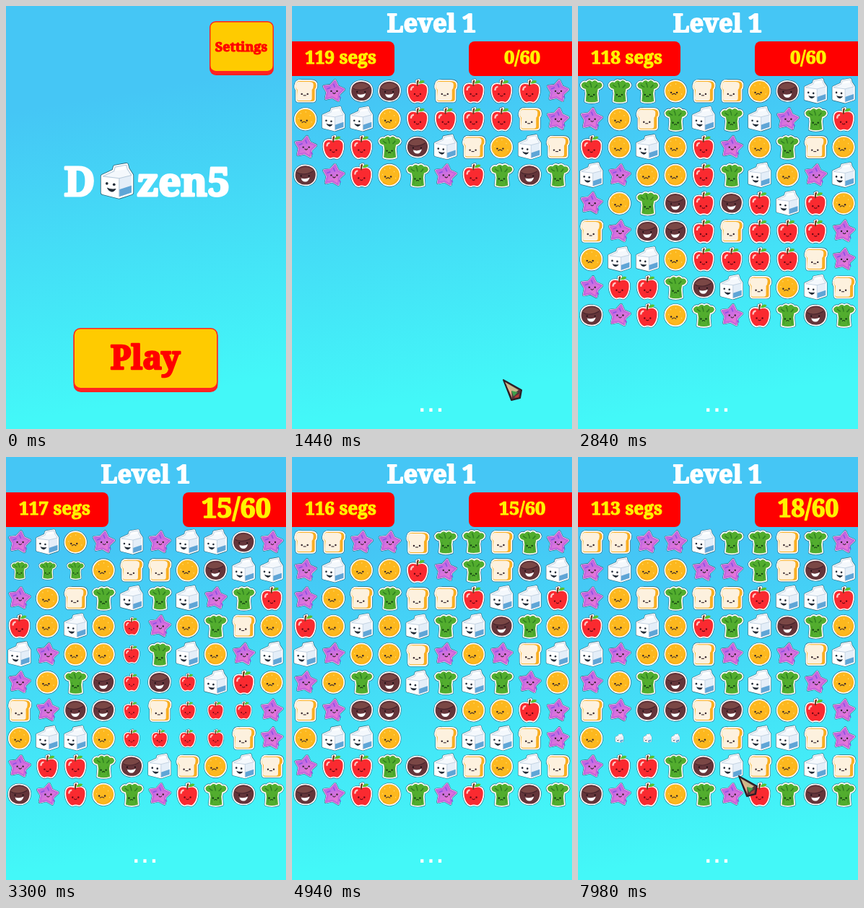
An HTML page for the animation above (8 s loop, 388 by 586 pixels).

```html
<!DOCTYPE html>
<html lang="en">
<head>
<meta charset="utf-8">
<title>Dozen5</title>
<style>
  html, body { margin: 0; width: 100%; height: 100%; overflow: hidden; background: #45c6f5; }
  svg { display: block; width: 388px; height: 586px; }
  .slab { font-family: "Noto Serif", "Liberation Serif", serif; font-weight: 900; text-anchor: middle;
          stroke-width: 1.1; stroke-linejoin: round; }
  .white { fill: #fff; stroke: #fff; }
  .red { fill: #f00; stroke: #f00; }
  .yellow { fill: #fff200; stroke: #fff200; }
  .plain { font: 44.7px "Liberation Sans", Arial, sans-serif; fill: #fff; text-anchor: middle; }
</style>
</head>
<body>
<svg viewBox="0 0 388 586" id="stage">
  <defs>
    <linearGradient id="sky" gradientUnits="userSpaceOnUse" x1="165" y1="120" x2="235" y2="540">
      <stop offset="0" stop-color="#45c6f5"/><stop offset="1" stop-color="#43f8f8"/>
    </linearGradient>
    <linearGradient id="lilac" x1="0" y1="0" x2=".5" y2="1">
      <stop offset="0" stop-color="#a866ee"/><stop offset="1" stop-color="#ee78d4"/>
    </linearGradient>
    <g id="sprites"></g>
  </defs>
  <rect width="388" height="586" fill="url(#sky)"/>

  <g id="menu">
    <rect x="282" y="22" width="89" height="74" rx="9" fill="#f22"/>
    <rect x="282.7" y="21.7" width="87.6" height="69" rx="8" fill="#ffcb00" stroke="#f22" stroke-width="1.4"/>
    <text class="slab red" x="326" y="63" font-size="18">Settings</text>
    <text class="slab white" x="102" y="263" font-size="56" style="stroke-width:3">D</text>
    <use href="#M" transform="translate(154 243) scale(1.42)"/>
    <text class="slab white" x="246" y="263" font-size="55" style="stroke-width:3">zen5</text>
    <rect x="93.500" y="447" width="200" height="88" rx="10" fill="#f22"/>
    <rect x="94.200" y="446.700" width="198.600" height="83" rx="9" fill="#ffcb00" stroke="#f22" stroke-width="1.4"/>
    <text class="slab red" x="193" y="503" font-size="45" style="stroke-width:2.500">Play</text>
  </g>

  <g id="game">
    <text class="slab white" x="193.500" y="36" font-size="34.500" style="stroke-width:1.800">Level 1</text>
    <rect x="-10" y="49" width="152" height="48" rx="8" fill="#f00"/>
    <rect x="245" y="49" width="160" height="48" rx="8" fill="#f00"/>
    <text class="slab yellow" id="clock" x="67.500" y="80" font-size="24.500"></text>
    <g id="score"><text class="slab yellow" id="scoreText" y="8" font-size="25.500"></text></g>
    <g id="board"></g>
    <text class="plain" id="status" x="192.500" y="562"></text>
    <g id="cursor" stroke-linejoin="round">
      <path d="M1 1L26 15L24 26L12 29Z" fill="#54343a" stroke="#2a1c22" stroke-width="2"/>
      <path d="M3 4L22 15L17 19L9 15Z" fill="#c9b98a"/>
      <path d="M5 8L12 16L13 26Z" fill="#e8b08a"/>
      <path d="M12 16L21 18L15 24Z" fill="#3fa04a"/>
      <path d="M18 23L23 20L22 25L16 26Z" fill="#b43a34"/>
    </g>
  </g>
</svg>
<script>
const $ = id => document.getElementById(id);
const LOOP = 8000, SIZE = 10, PITCH = 38.83;
const MENU_END = 130, STEP = 280, FALL = 300, SPAWN_DELAY = 110, SHRINK = 300, PULSE = 400;

// Sprites: silhouette with a white sticker edge, then details and a face
const INK = '#33222a';
const face = (x, y, mouth = 'M-2 0Q0 2 2 0', gap = 4, ink = INK) =>
  `<g transform="translate(${x} ${y})"><circle cx="${-gap}" cy="-2" r="1.2" fill="${ink}"/>` +
  `<circle cx="${gap}" cy="-2" r="1.2" fill="${ink}"/>` +
  `<path d="${mouth}" fill="none" stroke="${ink}" stroke-width="1.1"/></g>`;
const sticker = (id, d, fill, details) =>
  `<g id="${id}" stroke-linejoin="round"><path d="${d}" stroke="#23404f" stroke-opacity=".75" stroke-width="4.6"/>` +
  `<path d="${d}" fill="#fff" stroke="#fff" stroke-width="3.4"/><path d="${d}" fill="${fill}"/>${details}</g>`;
const disc = r => `M${-r} 0A${r} ${r} 0 1 1 ${r} 0A${r} ${r} 0 1 1 ${-r} 0Z`;
const starPath = () => {
  const at = (i, r) => {
    const a = -Math.PI / 2 + .15 + i * Math.PI / 5;
    return `${(r * Math.cos(a)).toFixed(1)} ${(r * Math.sin(a)).toFixed(1)}`;
  };
  let d = '';
  for (let i = 0; i < 10; i++) d += (i ? 'L' : 'M') + at(i, i % 2 ? 8.5 : 14.5);
  return d + 'Z';
};

$('sprites').innerHTML =
  sticker('B', 'M-13 -10Q-12 -15 -5 -14L8 -14Q15 -14 15 -8Q15 -4 13 -3L13 11Q13 14 9 14L-9 14Q-12 14 -12 11L-12 -2Q-15 -5 -13 -10Z',
    '#f9ae22', '<path d="M-13 -10Q-12 -14 -6 -13L6 -13Q12 -13 11 -7Q11 -4 9 -2L9 10Q9 13 6 13L-9 13Q-12 13 -12 10L-11 -2Q-15 -5 -13 -10Z" fill="#fdf1de"/>' +
    face(-1, 6, 'M-2 0H2')) +
  sticker('S', starPath(), 'url(#lilac)',
    `<path d="${starPath()}" fill="none" stroke="#c765dc" stroke-width="2.6"/>` +
    '<path d="M-9 -3L-4 -5M0 -10L2 -5M8 7L10 10" stroke="#8d4fe0" stroke-width="1.6"/>' + face(1, 2, 'M-2 0Q0 3 2 0')) +
  sticker('K', 'M-14 -2C-13 -11 -5 -14 2 -13C11 -12 15 -6 14 1C13 10 6 14 -2 13C-10 12 -15 6 -14 -2Z', '#64353a',
    '<path d="M-13 -3C-9 -12 4 -14 12 -6C6 -2 -5 1 -13 -3Z" fill="#7a4745"/>' +
    '<path d="M-12 -4C-7 0 5 -1 11 -6" fill="none" stroke="#48242c" stroke-width="1.2"/>' +
    '<path d="M-6 4Q0 6 6 3Q4 9 0 9Q-5 9 -6 4Z" fill="#fff"/>' +
    '<circle cx="-6" cy="1" r="1.1" fill="#1d1014"/><circle cx="5" cy="1" r="1.1" fill="#1d1014"/>') +
  sticker('A', 'M0 -8C3 -11 12 -11 13 -4C14 4 10 14 5 15Q0 13 -4 15C-10 14 -14 4 -13 -4C-12 -11 -4 -11 0 -8L-1 -14L2 -15Z', '#fa2a30',
    '<path d="M0 -7Q-1 -12 1 -15" fill="none" stroke="#6b3f1f" stroke-width="2"/>' +
    '<path d="M1 -11Q5 -17 10 -14Q7 -9 1 -11Z" fill="#57c030"/>' +
    '<path d="M-9 -1Q-9 -6 -5 -6" fill="none" stroke="#ffc4c0" stroke-width="2.4"/>' + face(0, 6, 'M-2 0Q0 2 2 0', 4, '#6b0713')) +
  sticker('O', disc(14), '#fdb81e',
    '<path d="M-9 8A12 12 0 0 0 12 -3A14 14 0 0 1 -9 11Z" fill="#f9a512"/>' +
    '<path d="M-7 -8h1M0 -10h1M6 -5h1M-10 -1h1M8 4h1" stroke="#ffe07a" stroke-width="1.5"/>' + face(-2, 4, 'M-3 1Q0 -2 3 1', 4)) +
  sticker('M', 'M-14 -5L-3 -10L-2 -14L9 -16L10 -12L14 -6L14 11L2 15L-14 11Z', '#fff',
    '<path d="M2 -3L14 -6V11L2 15Z" fill="#e4eef8"/><path d="M2 8L14 4V11L2 15Z" fill="#5fa5d6"/>' +
    '<path d="M-14 -5L-3 -10L10 -12L14 -6L2 -3Z" fill="#f4f8fc"/>' +
    '<path d="M-14 -5L2 -3L14 -6M2 -3V15M-14 -5L-3 -10L-2 -14L9 -16L10 -12L14 -6" fill="none" stroke="#b8cadb" stroke-width=".8"/>' +
    '<circle cx="-10" cy="2" r="1.3" fill="#222b36"/><circle cx="-3" cy="3" r="1.3" fill="#222b36"/>' +
    '<path d="M-10 6Q-6 8 -1 7Q-3 11 -6 10Q-9 9 -10 6Z" fill="#222b36"/>') +
  sticker('C', 'M-8 -3Q-14 -4 -14 -9Q-11 -14 -7 -12Q-3 -17 1 -13Q5 -17 9 -12Q14 -13 15 -8Q14 -4 9 -3L8 3L9 14Q0 17 -8 14L-7 3Z', '#52ad2e',
    '<path d="M-9 -9Q-6 -5 -4 -6M-2 -12Q0 -8 0 -5M8 -9Q6 -5 4 -5" fill="none" stroke="#2f8020" stroke-width="1.5"/>' +
    '<path d="M-5 0V12M6 0V12" stroke="#3d9428" stroke-width="1"/>' + face(0, 7, 'M-2 1Q0 -1 2 1', 3.5, '#123d12'));

// Rows in the order they drop in, then refills for each column
const rows = ['KSAOCSACKC', 'SAACKMBOMB', 'OMMOAAAABS', 'BSKKABAAAS', 'SOCKAKAMAO',
  'MSOOACMOSM', 'AOMOASOCBO', 'SOBCMCMSCA', 'CCCOBBOKMM', 'SMOSMSMMKS'];
const refills = ['B', 'B', 'S', '', 'BABSM', 'C', 'ACC', 'BB', 'C', ''];
const queues = refills.map((extra, c) => [...rows.map(r => r[c]), ...extra]);

const pieces = [], scores = [{ at: -PULSE, value: 0 }];
const grid = Array.from({ length: SIZE }, () => Array(SIZE).fill(null));

function move(piece, at, col, row) {
  const { col: c, row: r } = piece;
  piece.moves.push({ at, c, r, dc: col - c, dr: row - r });
  Object.assign(piece, { col, row });
  grid[row][col] = piece;
}

function spawn(at, col) {
  const node = document.createElementNS('http://www.w3.org/2000/svg', 'use');
  const piece = { type: queues[col].shift(), col, row: -1, born: at, died: Infinity, moves: [], node };
  node.setAttribute('href', '#' + piece.type);
  $('board').append(node);
  pieces.push(piece);
  move(piece, at, col, 0);
}

function step(at) {
  for (let c = 0; c < SIZE; c++) {
    for (let r = SIZE - 1; r > 0; r--) {
      const above = grid[r - 1][c];
      if (grid[r][c] || !above) continue;
      grid[r - 1][c] = null;
      move(above, at, c, r);
    }
    if (!grid[0][c]) spawn(at + SPAWN_DELAY, c);
  }
}

function clearMatches(at) {
  const hits = new Set();
  const type = (r, c) => grid[r]?.[c]?.type;
  for (let r = 0; r < SIZE; r++) for (let c = 0; c < SIZE; c++)
    for (const [dr, dc] of [[0, 1], [1, 0]]) {
      const run = [0, 1, 2].map(k => [r + dr * k, c + dc * k]);
      if (run.every(([y, x]) => type(y, x) === type(r, c))) run.forEach(([y, x]) => hits.add(grid[y][x]));
    }
  for (const p of hits) { p.died = at; grid[p.row][p.col] = null; }
  scores.push({ at, value: scores.at(-1).value + hits.size });
}

function swap(at, row, col) {
  const left = grid[row][col], right = grid[row][col + 1];
  move(left, at, col + 1, row);
  move(right, at, col, row);
}

for (let k = 0; k < 10; k++) step(332 + STEP * k);
clearMatches(3230);
for (let k = 0; k < 5; k++) step(4100 + STEP * k);
swap(7200, 7, 3);
clearMatches(7790);

const elastic = u => u <= 0 ? 0 : u >= 1 ? 1 :
  1 + 2 ** (-10 * u) * Math.sin((u - .075) * 2 * Math.PI / .3);

// Pointer tracks: time, x, y
const tracks = [
  [[130, 200, 490], [900, 240, 505], [1300, 292, 517], [1500, 292, 517], [1820, 392, 523]],
  [[5880, 180, 106], [6120, 180, 106], [6230, 338, 455], [6430, 209, 373], [6900, 209, 373],
    [6970, 206, 373], [7120, 206, 373], [7700, 222, 441], [8000, 222, 441]]
];

function pointer(t) {
  const track = tracks.find(k => t >= k[0][0] && t < k.at(-1)[0]);
  if (!track) return null;
  const i = track.findIndex(k => k[0] > t), [t0, x0, y0] = track[i - 1], [t1, x1, y1] = track[i];
  const u = (t - t0) / (t1 - t0);
  return [x0 + (x1 - x0) * u, y0 + (y1 - y0) * u];
}

const show = (node, on) => node.setAttribute('visibility', on ? 'inherit' : 'hidden');

function drawPiece(p, t) {
  const scale = 1 - Math.max(0, t - p.died) / SHRINK;
  const visible = t >= p.born && scale > 0;
  show(p.node, visible);
  if (!visible) return;
  const m = p.moves.findLast(m => m.at <= t), e = elastic((t - m.at) / FALL);
  const x = 18.6 + PITCH * (m.c + m.dc * e), y = 118 + PITCH * (m.r + m.dr * e);
  p.node.setAttribute('transform', `translate(${x} ${y}) scale(${scale})`);
}

function render(t) {
  const playing = t >= MENU_END;
  show($('menu'), !playing);
  show($('game'), playing);
  $('clock').textContent = `${120 - Math.max(0, Math.floor((t - 50) / 1000))} segs`;
  const score = scores.findLast(s => s.at <= t);
  const pulse = 1 + .6 * Math.max(0, 1 - (t - score.at) / PULSE);
  $('scoreText').textContent = `${score.value}/60`;
  $('score').setAttribute('transform', `translate(319 72) scale(${pulse})`);
  $('status').textContent = t >= 5880 && t < 7120 ? 'MOVE!' : '...';
  pieces.forEach(p => drawPiece(p, t));
  const tip = pointer(t);
  show($('cursor'), tip);
  if (tip) $('cursor').setAttribute('transform', `translate(${tip})`);
}

const start = performance.now();
function frame() {
  render((performance.now() - start) % LOOP);
  requestAnimationFrame(frame);
}
frame();
</script>
</body>
</html>
```
